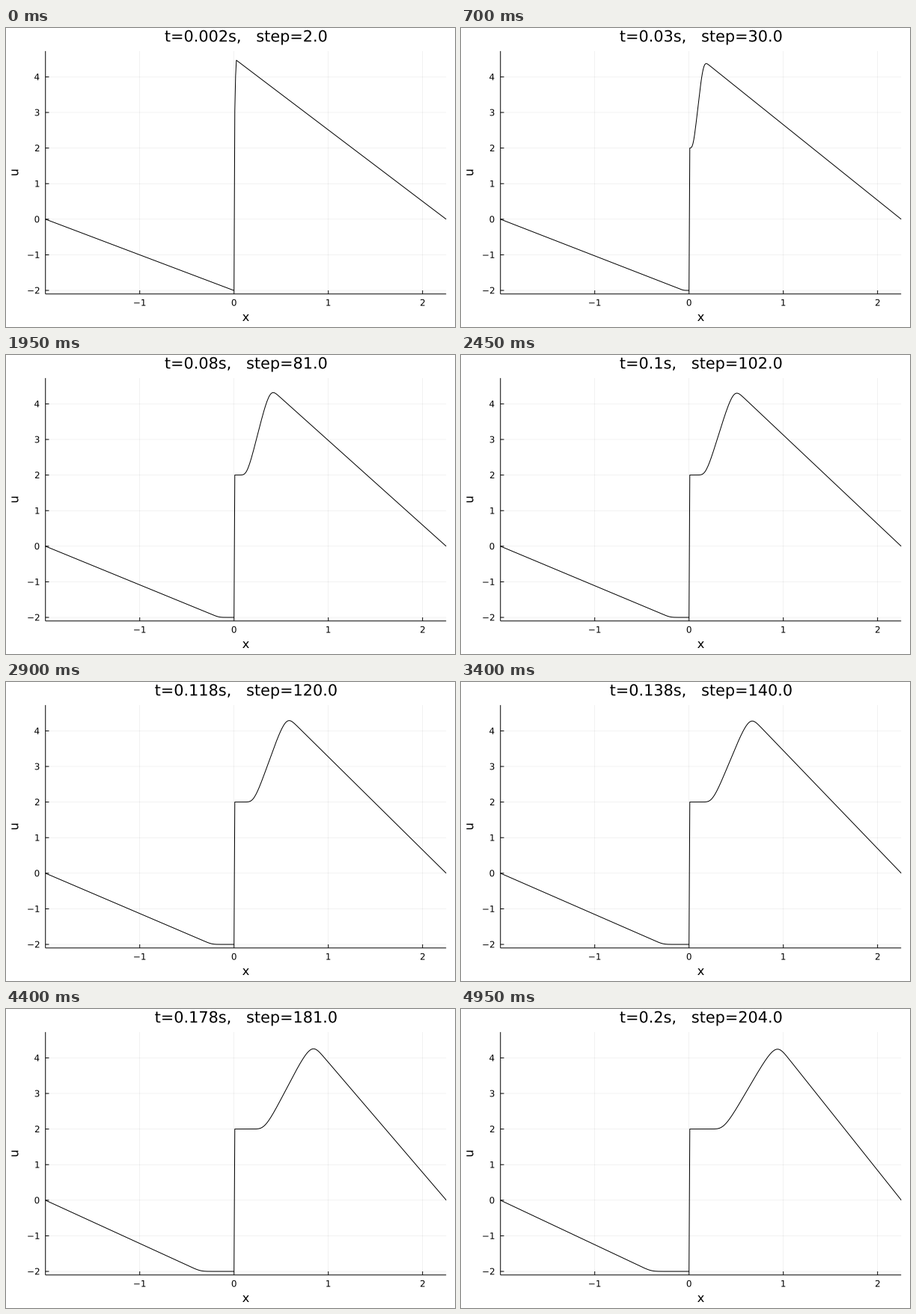
Animation, 600 px wide and 400 px high, one loop 5000 ms. Source, as a matplotlib script:

```python
import numpy as np
import matplotlib
import matplotlib.pyplot as plt
from matplotlib.animation import FuncAnimation
from matplotlib.patches import PathPatch
from matplotlib.textpath import TextPath
from matplotlib.transforms import Affine2D

W, H, DPI = 600, 400, 100
FRAMES, INTERVAL = 100, 50
T_END, STEPS, CELLS = 0.2, 204, 510

# Plot area in pixels, and the data range it covers
LEFT, RIGHT, TOP, BOTTOM = 52.74, 588.19, 30.87, 355.8
X_MIN, X_MAX, U_MIN, U_MAX = -2, 2.25, -2.1, 4.725
MID_X, MID_Y = (LEFT + RIGHT) / 2, (TOP + BOTTOM) / 2
TICK = 4.72
TITLE_SIZE, LABEL_SIZE, TICK_SIZE = 20.8, 16.3, 11.9

matplotlib.rcParams["font.family"] = "DejaVu Sans"


def to_px(x):
    return LEFT + (x - X_MIN) / (X_MAX - X_MIN) * (RIGHT - LEFT)


def to_py(u):
    return BOTTOM - (u - U_MIN) / (U_MAX - U_MIN) * (BOTTOM - TOP)


def flux(v):
    return v * v / 2


def solve():
    """Burgers' equation by Roe's upwind scheme, without an entropy fix."""
    x = np.linspace(X_MIN, X_MAX, CELLS + 1)
    ratio = (T_END / STEPS) / (x[1] - x[0])
    u = np.where(x < 1e-9, -(x + 2), 4.5 - 2 * x)
    history = [u]
    for _ in range(STEPS):
        a, b = u[:-1], u[1:]
        face = np.where(a + b >= 0, flux(a), flux(b))
        u = u.copy()
        u[1:-1] -= ratio * np.diff(face)
        history.append(u)
    return x, history


x, history = solve()

fig = plt.figure(figsize=(W / DPI, H / DPI), dpi=DPI, facecolor="white")
ax = fig.add_axes([0, 0, 1, 1])
ax.set_xlim(0, W)
ax.set_ylim(0, H)
ax.axis("off")


def line(xs, ys, width=1.0, **kw):
    """Unsnapped line in pixels, measured from the top left."""
    return ax.plot(xs, H - np.asarray(ys, float), color="black",
                   lw=width * 72 / DPI, snap=False,
                   solid_capstyle="butt", **kw)[0]


def text_path(text, size, px, baseline, align=0.5):
    """Glyph outlines; align 0.5 centres the ink on px, 1 ends it there."""
    path = TextPath((0, 0), text, size=size)
    box = path.get_extents()
    shift = px - box.x0 - align * box.width
    return path.transformed(Affine2D().translate(shift, H - baseline))


def draw_text(path):
    return ax.add_patch(PathPatch(path, facecolor="black", lw=0, snap=False))


def tick_text(value):
    return str(value).replace("-", "\u2212")


for value in range(-1, 3):
    px = to_px(value)
    line([px, px], [TOP, BOTTOM], 0.5, alpha=0.1)
    line([px, px], [BOTTOM, BOTTOM - TICK])
    draw_text(text_path(tick_text(value), TICK_SIZE, px, 371.6))

for value in range(-2, 5):
    py = to_py(value)
    line([LEFT, RIGHT], [py, py], 0.5, alpha=0.1)
    line([LEFT, LEFT + TICK], [py, py])
    draw_text(text_path(tick_text(value), TICK_SIZE, 44.4, py + 4.34, 1))

line([LEFT, RIGHT], [BOTTOM, BOTTOM])
line([LEFT, LEFT], [BOTTOM, TOP])

draw_text(text_path("x", LABEL_SIZE, MID_X, 392))
upright = text_path("u", LABEL_SIZE, 0, H)
draw_text(upright.transformed(
    Affine2D().rotate_deg(90).translate(16.3, H - MID_Y)))

title = draw_text(text_path("t", TITLE_SIZE, MID_X, 18.2))
curve = line([], [])


def update(i):
    k = i + 1
    step = k * STEPS // FRAMES
    t = round(k * T_END / FRAMES, 3)
    curve.set_data(to_px(x), H - to_py(history[step]))
    title.set_path(text_path(f"t={t}s,   step={float(step)}",
                             TITLE_SIZE, MID_X, 18.2))
    return curve, title


anim = FuncAnimation(fig, update, frames=FRAMES, interval=INTERVAL,
                     repeat=True, repeat_delay=0)
plt.show()
```
